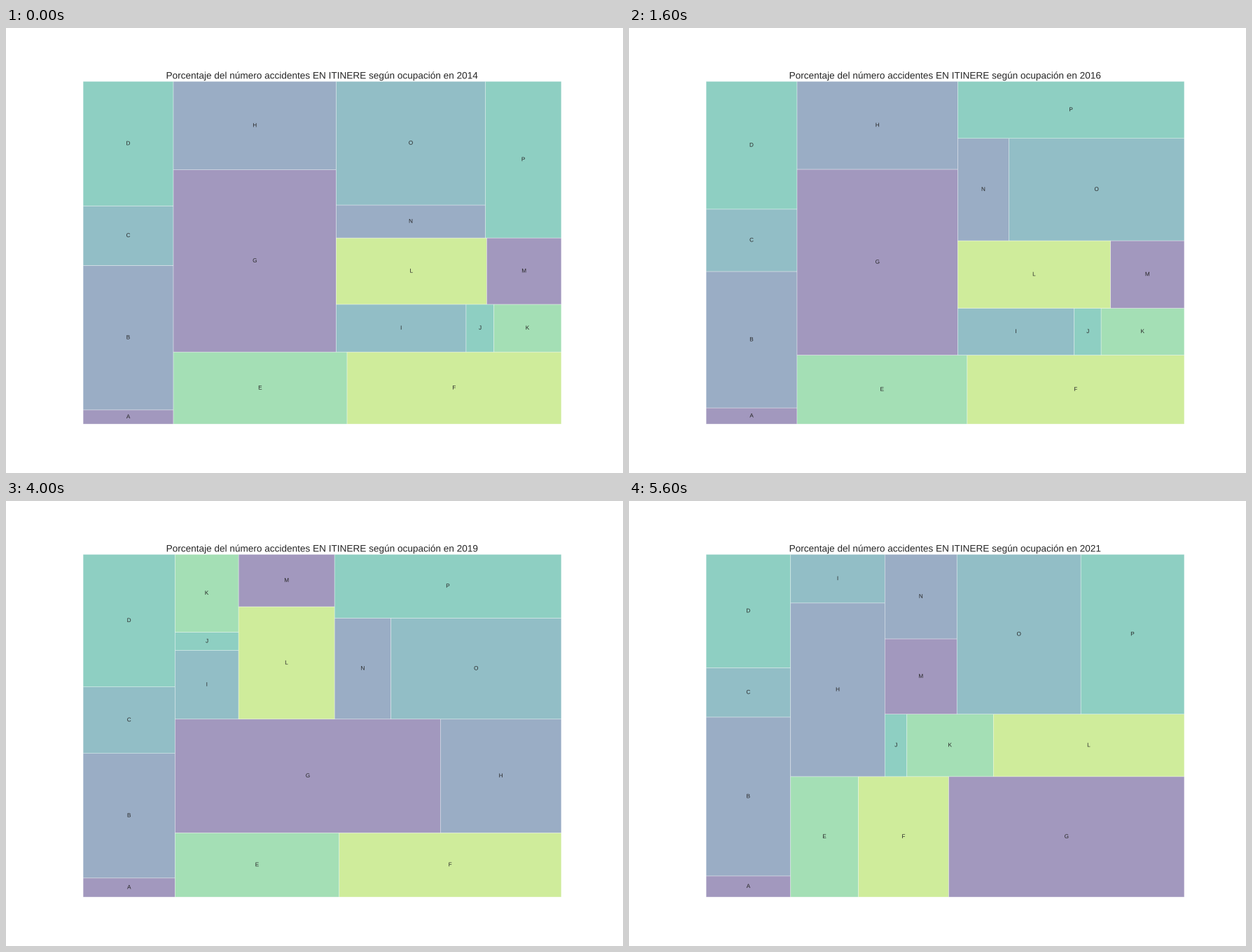
A matplotlib script that plays this animation: 881 px wide and 636 px high, repeating every 6400 ms.

```python
import numpy as np
import matplotlib.pyplot as plt
from matplotlib.animation import FuncAnimation
from matplotlib.patches import PathPatch, Rectangle
from matplotlib.textpath import TextPath

WIDTH, HEIGHT, DPI = 881, 636, 64
BOX = (0.125 * WIDTH, 0.11 * HEIGHT, 0.775 * WIDTH, 0.77 * HEIGHT)
YEARS = range(2014, 2022)
LABELS = "ABCDEFGHIJKLMNOP"
PALETTE = ["#46327e", "#365c8d", "#277f8e", "#1fa187", "#4ac16d", "#a0da39"]
INK = "0.15"

# Relative weights of A to P: slow drift at first, then a quick shift
KEY_YEARS = [2014, 2019, 2020.25]
KEY_MIXES = np.array([
    [78, 796, 328, 686, 764, 942, 1810, 878, 378, 81, 196, 610, 302, 300, 1126, 725],
    [107, 699, 373, 743, 643, 870, 1840, 838, 266, 71, 301, 658, 306, 347, 1050, 880],
    [109, 820, 255, 585, 500, 665, 1735, 1000, 280, 84, 330, 728, 332, 372, 1210, 1010],
])

# Strips cut off the remaining area: "|" from the left, "-" from the bottom
PLANS = {
    2014: "|ABCD -EF |GH -IJK -LM |NO |P",
    2016: "|ABCD -EF |GH -IJK -LM -NO |P",
    2017: "|ABCD -EF |GH -IJK -LM |NO |P",
    2019: "|ABCD -EF -GH |IJK |LM -NO |P",
    2020: "|ABCD -EFG |HI -JKL |MN |O |P",
}

plt.rcParams["font.family"] = "Liberation Sans"


def weights(year):
    mix = [np.interp(year, KEY_YEARS, column) for column in KEY_MIXES.T]
    return dict(zip(LABELS, mix))


def tiles(year):
    """Yield label, x, y, width and height of each tile."""
    size = weights(year)
    left = sum(size.values())
    x, y, w, h = BOX
    plan = PLANS[max(start for start in PLANS if start <= year)]
    for cut, *group in plan.split():
        total = sum(size[name] for name in group)
        share = total / left
        done = 0
        for name in group:
            part = size[name] / total
            if cut == "|":
                yield name, x, y + done * h, w * share, h * part
            else:
                yield name, x + done * w, y, w * part, h * share
            done += part
        if cut == "|":
            x, w = x + w * share, w * (1 - share)
        else:
            y, h = y + h * share, h * (1 - share)
        left -= total


fig = plt.figure(figsize=(WIDTH / DPI, HEIGHT / DPI), dpi=DPI, facecolor="white")
ax = fig.add_axes([0, 0, 1, 1])


def write(text, cx, baseline, size):
    """Draw text as outlines, centred on cx at subpixel precision."""
    ink = TextPath((0, 0), text, size=size).get_extents()
    path = TextPath((cx - (ink.x0 + ink.x1) / 2, baseline), text, size=size)
    ax.add_patch(PathPatch(path, facecolor=INK, linewidth=0, snap=False))


def draw(frame):
    year = YEARS[frame]
    ax.clear()
    ax.set(xlim=(0, WIDTH), ylim=(0, HEIGHT))
    ax.axis("off")
    for name, x, y, w, h in tiles(year):
        color = PALETTE[LABELS.index(name) % len(PALETTE)]
        ax.add_patch(Rectangle((x, y), w, h, facecolor=color, edgecolor="white",
                               linewidth=0.68 * 72 / DPI, alpha=0.5, snap=False))
        write(name, x + w / 2, y + h / 2 - 2.06, 8.16)
    write(f"Porcentaje del número accidentes EN ITINERE según ocupación en {year}",
          BOX[0] + BOX[2] / 2, BOX[1] + BOX[3] + 3.9, 13.6)
    return []


anim = FuncAnimation(fig, draw, frames=len(YEARS), interval=800, repeat=True)
plt.show()
```
